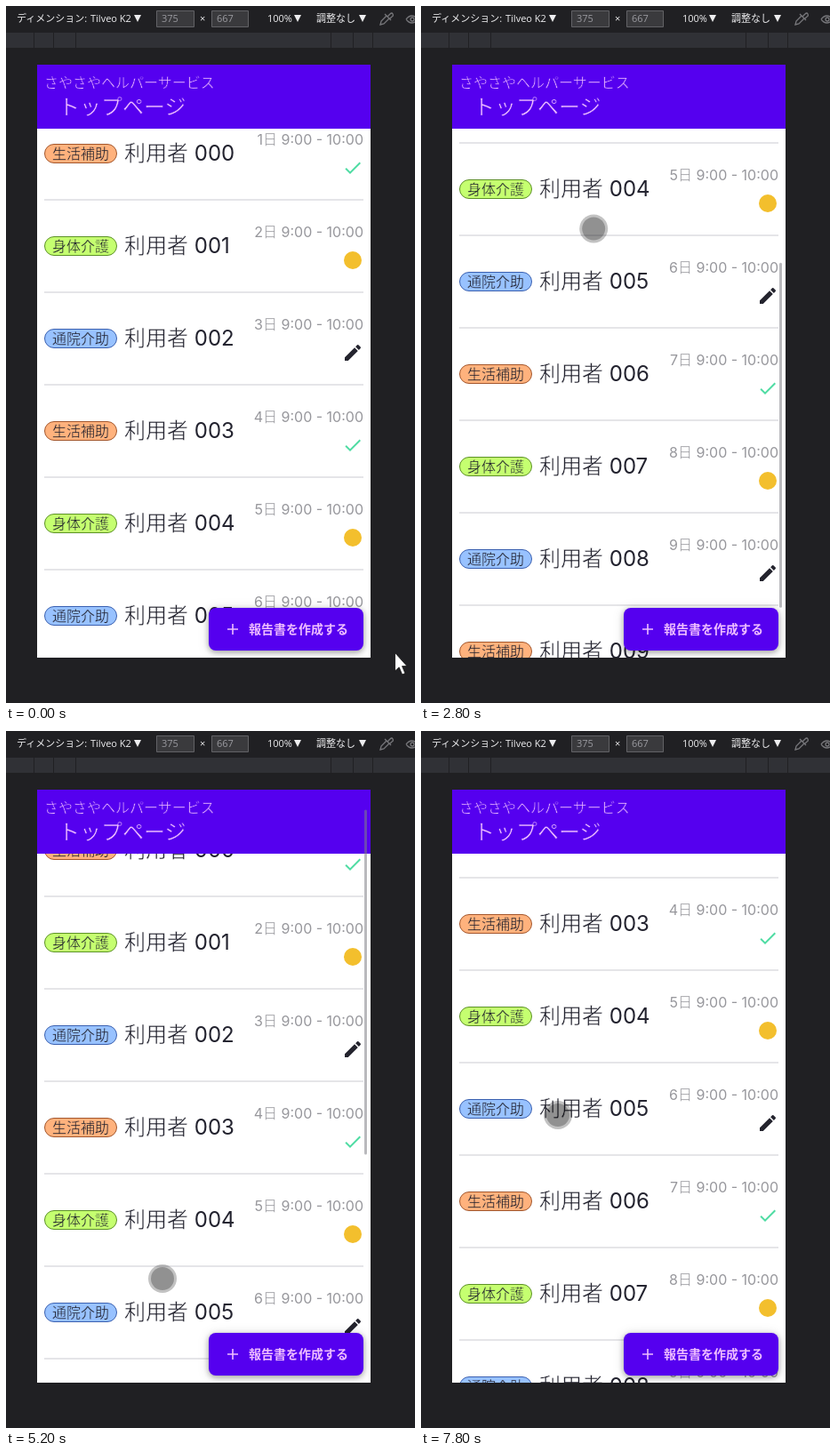
An HTML page for the animation above (8 s loop, 460 by 784 pixels).

```html
<!DOCTYPE html>
<html lang="ja">
<head>
<meta charset="utf-8">
<style>
html, body { margin: 0; height: 100%; overflow: hidden; background: #202023; }
svg { display: block; width: 460px; height: 784px; font-family: Inter, "Noto Sans CJK JP", "Noto Sans CJK", sans-serif; }
.tools { font: 11px "Open Sans", "Noto Sans CJK JP", "Noto Sans CJK", sans-serif; fill: #eeeef0; }
.name { font-size: 24px; fill: #23232f; }
.date { font-size: 16px; fill: #97979c; text-anchor: end; }
.chip { font-size: 16px; fill: #22222e; }
.head { fill: #eebcff; }
/* a stroke in the background colour makes the glyphs lighter */
.thin { font-weight: 300; stroke-width: .5px; }
.name .thin, .date .thin { stroke: #fff; }
.head.thin { stroke: #5500ef; }
#button { filter: drop-shadow(0 2px 3px rgba(0,0,0,.3)) drop-shadow(0 1px 6px rgba(0,0,0,.14)); }
</style>
</head>
<body>
<svg viewBox="0 0 460 784">
  <defs>
    <clipPath id="screen"><path d="M35 66h375v667h-375z"/></clipPath>
    <path id="down" d="M-4-4h8L0 4z" fill="#eeeef0"/>
  </defs>
  <rect width="460" height="784" fill="#202023"/>
  <rect y="30" width="460" height="17" fill="#303136"/>
  <path d="M31.5 30v17M53.5 30v17M78.5 30v17M365.5 30v17M390.5 30v17M412.5 30v17" stroke="#202023"/>
  <g class="tools">
    <text x="12" y="18">ディメンション:</text>
    <text x="95" y="18">Tilveo K2</text>
    <path d="M169.5 5.5h42v18h-42zM231.5 5.5h41v18h-41z" fill="#3a3a3d" stroke="#626266"/>
    <g fill="#9a9a9f"><text x="175" y="18">375</text><text x="237" y="18">667</text></g>
    <text x="218" y="18">×</text>
    <text x="294" y="18">100%</text>
    <text x="349" y="18">調整なし</text>
    <use href="#down" x="148" y="14"/><use href="#down" x="328" y="14"/><use href="#down" x="401" y="14"/>
  </g>
  <g fill="none" stroke="#77777b" stroke-width="1.3">
    <path d="M421 21l1-4 6-6 3 3-6 6zM426 9l7 7M429 12l3-3q2-2 3 0t-1 3l-3 3"/>
    <path d="M450 15q6-8 14 0-8 8-14 0"/><circle cx="457" cy="15" r="2"/>
  </g>

  <g clip-path="url(#screen)">
    <rect x="35" y="66" width="375" height="667" fill="#fff"/>
    <g id="list"></g>
    <rect x="35" y="66" width="375" height="72" fill="#5500ef"/>
    <g class="head thin">
      <text x="43" y="92" font-size="16">さやさやヘルパーサービス</text>
      <text x="59" y="121.5" font-size="24">トップページ</text>
    </g>
    <rect id="button" x="228" y="677" width="174" height="48" rx="8" fill="#5500ef"/>
    <path d="M249 701h12M255 695v12" stroke="#eebcff" stroke-width="1.6"/>
    <text class="head" x="273" y="706" font-size="14" font-weight="700">報告書を作成する</text>
    <rect id="bar" x="403" width="3" height="388" rx="1.5" fill="#808088" fill-opacity=".55"/>
  </g>
  <g id="touch">
    <circle r="16" fill-opacity=".24"/>
    <circle r="13" fill-opacity=".25"/>
  </g>
  <path id="arrow" d="M437.5 727.5v20.500l4.600-4.200 3.500 8.200 3.300-1.400-3.400-8h5.500z" fill="#fff" stroke="#111" stroke-width=".8"/>
</svg>
<script>
const $ = id => document.getElementById(id);
const clamp = v => Math.min(1, Math.max(0, v));
const ease = u => u * u * u * (10 - 15 * u + 6 * u * u);

const kinds = [
  { label: '生活補助', fill: '#ffb27d', line: '#a3562c',
    icon: '<path fill="#4fdca3" d="M9 16.2 4.800 12l-1.400 1.400L9 19 21 7l-1.400-1.400z"/>' },
  { label: '身体介護', fill: '#c5ff70', line: '#5c9126',
    icon: '<circle cx="12" cy="12" r="10" fill="#f3bf2d"/>' },
  { label: '通院介助', fill: '#98c2ff', line: '#3a60b0',
    icon: '<path fill="#24242e" d="M3 17.250V21h3.750L17.800 9.900l-3.750-3.750zM20.700 7q.7-.7 0-1.400l-2.300-2.300q-.7-.7-1.400 0l-1.900 1.900 3.750 3.750z"/>' }
];

function row(i) {
  const { label, fill, line, icon } = kinds[i % 3];
  return `<g transform="translate(0 ${i * 104})">
    <rect x="43.5" y="155.5" width="81" height="21" rx="10.5" fill="${fill}" stroke="${line}"/>
    <text class="chip thin" x="52" y="172" style="stroke:${fill};stroke-width:.3px">${label}</text>
    <text class="name" x="133" y="174"><tspan class="thin">利用者</tspan> 00${i}</text>
    <text class="date" x="402" y="156">${i + 1}<tspan class="thin">日</tspan> 9:00 - 10:00</text>
    <g transform="translate(378 170)">${icon}</g>
    <rect x="43" y="217" width="359" height="2" fill="#e5e5e8"/>
  </g>`;
}
$('list').innerHTML = Array.from({ length: 10 }, (_, i) => row(i)).join('');

// where the finger turns: time, x, y
const turns = [
  [200, 398, 731], [600, 387, 733], [1000, 341, 640], [1400, 243, 634], [1800, 222, 630],
  [2900, 194, 248], [3540, 174, 241], [4400, 177, 556], [4600, 178, 558],
  [5800, 174, 674], [6600, 166, 699], [7200, 154, 432]
];

// while dragging, scroll + finger y stays at "sum"
const drags = [
  { start: 1900, end: 3500, sum: 629.5 },
  { start: 3540, end: 5480, sum: 643 },
  { start: 6600, end: 7300, sum: 693 }
];
const TOP = -6, LAG = 30;

function finger(t) {
  const n = turns.findIndex(k => k[0] > t);
  if (n < 1) return turns.at(n).slice(1);
  const [t0, x0, y0] = turns[n - 1], [t1, x1, y1] = turns[n];
  const u = ease((t - t0) / (t1 - t0));
  return [x0 + (x1 - x0) * u, y0 + (y1 - y0) * u];
}

function draw(now) {
  const t = Math.floor(now % 8000 / 200) * 200;
  const [x, y] = finger(t);
  const drag = drags.findLast(d => t >= d.start);
  const scroll = drag ? Math.max(TOP, drag.sum - finger(t - LAG)[1]) : 0;
  $('list').setAttribute('transform', `translate(0 ${Math.round(-scroll)})`);
  $('bar').setAttribute('y', 66 + (scroll - TOP) * 0.583);
  $('bar').setAttribute('opacity', drag ? clamp(1 - (t - drag.end) / 400) : 0);
  $('touch').setAttribute('transform', `translate(${x} ${y})`);
  $('touch').style.display = t < 200 ? 'none' : '';
  $('arrow').style.display = t < 200 ? '' : 'none';
  requestAnimationFrame(draw);
}
draw(performance.now());
</script>
</body>
</html>
```
